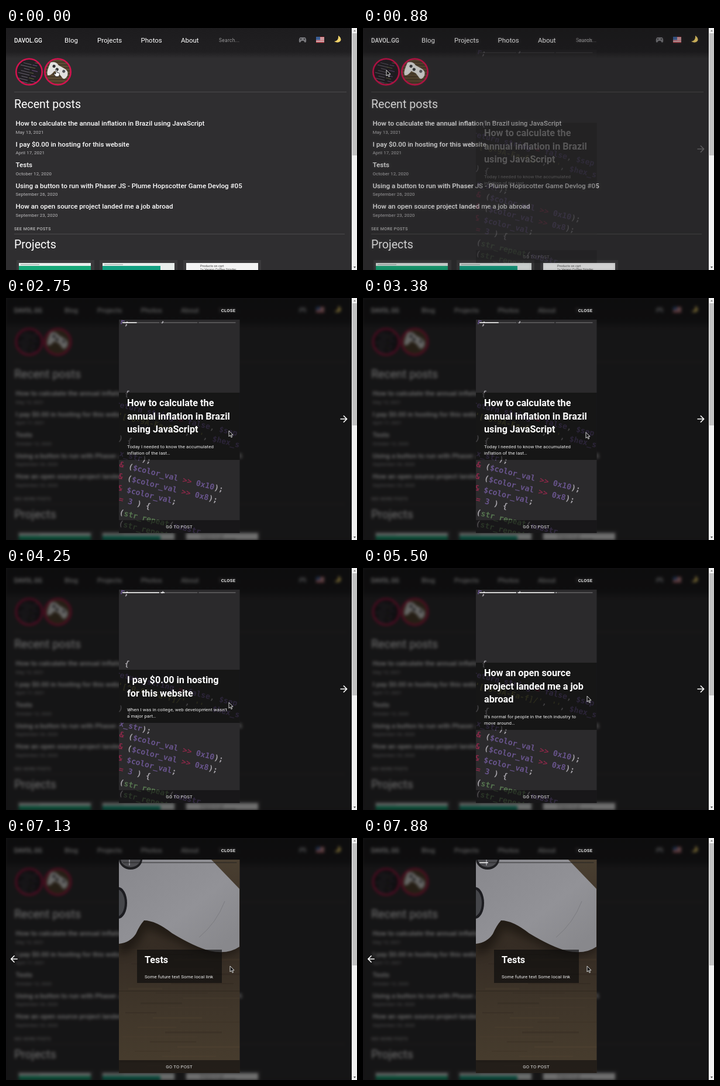
An HTML page with a canvas that plays this animation: 600 by 414 pixels, repeating every 8000 ms.

```html
<!DOCTYPE html>
<html lang="en">
<head>
<meta charset="utf-8">
<title>Blog stories</title>
<style>
  html, body { margin: 0; width: 100%; height: 100%; overflow: hidden; background: #2f2e30; }
  canvas { display: block; width: 600px; height: 414px; }
</style>
</head>
<body>
<canvas id="stage" width="600" height="414"></canvas>
<script>
const W = 600, H = 414, LOOP = 8000, OPEN = 880;
const FACE = 'Roboto, Arial, sans-serif';
const stage = document.getElementById('stage').getContext('2d');

const stories = [
  { from: OPEN, seg: 0, top: 162, bottom: 277,
    title: ['How to calculate the', 'annual inflation in Brazil', 'using JavaScript'],
    text: ['Today I needed to know the accumulated', 'inflation of the last…'] },
  { from: 3720, seg: 1, top: 174, bottom: 265,
    title: ['I pay $0.00 in hosting', 'for this website'],
    text: ['When I was in college, web development wasn’t', 'a major part…'] },
  { from: 5400, seg: 2, top: 162, bottom: 277,
    title: ['How an open source', 'project landed me a job', 'abroad'],
    text: ['It’s normal for people in the tech industry to', 'move around…'] },
  { from: 7120, wood: true, left: 224, right: 369, top: 191, bottom: 248,
    title: ['Tests'], text: ['Some future text Some local link'] }
];

// time, x, y of the pointer tip
const pointerPath = [
  [0, 86, 71], [130, 86, 71], [630, 40, 72], [950, 40, 72], [1600, 143, 115],
  [1750, 143, 115], [2500, 381, 227], [2800, 381, 227], [3500, 381, 230],
  [4500, 381, 230], [5250, 383, 219], [8000, 383, 219]
];

function layer(paint) {
  const canvas = document.createElement('canvas');
  canvas.width = W;
  canvas.height = H;
  paint(canvas.getContext('2d'));
  return canvas;
}

function box(c, x, y, w, h, color) {
  c.fillStyle = color;
  c.fillRect(x, y, w, h);
}

function text(c, str, x, y, size, color = '#fff', weight = 400, spacing = 0, align = 'left') {
  c.font = `${weight} ${size}px ${FACE}`;
  c.letterSpacing = spacing + 'px';
  c.textAlign = align;
  c.fillStyle = color;
  c.fillText(str, x, y);
  c.letterSpacing = '0px';
}

function disc(c, x, y, rx, ry, color) {
  c.fillStyle = color;
  c.beginPath();
  c.ellipse(x, y, rx, ry, 0, 0, 7);
  c.fill();
}

function shape(c, d, fill, stroke, width = 1) {
  const path = new Path2D(d);
  if (fill) { c.fillStyle = fill; c.fill(path); }
  if (stroke) { c.strokeStyle = stroke; c.lineWidth = width; c.stroke(path); }
}

function codeLine(c, str, x, y) {
  c.save();
  c.translate(x, y);
  c.rotate(0.24);
  c.font = 'bold 13.2px "DejaVu Sans Mono", monospace';
  c.textAlign = 'left';
  let at = 0;
  for (const part of str.match(/'[^']*'|\$\w+|str_\w+|\w+|[^\w$']/g)) {
    c.fillStyle = /^'/.test(part) ? '#67683c'
      : /^str_/.test(part) ? '#56744f'
      : /^[$\w]/.test(part) ? '#68548c'
      : /[>&=]/.test(part) ? '#8a2848' : '#a5a2a8';
    c.fillText(part, at, 0);
    at += c.measureText(part).width;
  }
  c.restore();
}

function ring(c, x, y, paint) {
  c.save();
  c.beginPath();
  c.arc(x, y, 21.5, 0, 7);
  c.clip();
  c.translate(x, y);
  paint(c);
  c.restore();
  c.strokeStyle = '#d3134f';
  c.lineWidth = 2.6;
  c.beginPath();
  c.arc(x, y, 22.2, 0, 7);
  c.stroke();
}

function ringCode(c) {
  box(c, -24, -24, 48, 48, '#222024');
  c.rotate(0.24);
  for (let i = 0; i < 9; i++) {
    const y = -18 + i * 4.6;
    box(c, -20 + (i * 7) % 11, y, 9 + (i * 5) % 14, 1, '#67616e');
    box(c, 6 - (i * 3) % 7, y, 7 + i % 4, 1, i % 2 ? '#6a4d80' : '#63653f');
  }
}

function ringPad(c) {
  box(c, -24, -24, 48, 48, '#4a3c2a');
  for (let y = -20; y < 24; y += 5) box(c, -24, y, 48, 1.3, '#67563a');
  c.rotate(0.35);
  c.scale(0.85, 0.85);
  shape(c, 'M-20-13Q-11-19-3-13L10-11Q20-10 21 0Q20 10 14 9L3 2L-7 1Q-11 14-17 13Q-22 9-20-13Z', '#e2e1df');
  disc(c, -11, -8, 3, 3, '#303033');
  disc(c, -3, -4, 3, 3, '#303033');
  disc(c, 11, -5, 3, 3, '#55555a');
}

function paintHeader(c) {
  const g = c.createLinearGradient(0, 0, 0, 52);
  g.addColorStop(0, '#1d1c1e');
  g.addColorStop(0.78, '#201f21');
  g.addColorStop(1, '#2f2e30');
  box(c, 0, 0, W, 52, g);
  text(c, 'DAVOL.GG', 14, 25, 10, '#fff', 500);
  for (const [label, x] of [['Blog', 100], ['Projects', 156], ['Photos', 230.5], ['About', 299]])
    text(c, label, x, 25, 11.5);
  text(c, 'Search...', 364, 24, 8.3, '#9b9a9c', 400, 0.35);

  shape(c, 'M503 16H511Q514 18 513 24Q510 26 509 22H505Q503 26 501 24Q500 18 503 16Z', '#77777b');
  disc(c, 504, 19, 1.2, 1.2, '#39393c');
  disc(c, 510, 19, 1.2, 1.2, '#39393c');

  for (let i = 0; i < 7; i++) box(c, 530, 15 + i * 1.45, 14, 1.5, i % 2 ? '#f3eeee' : '#cb4650');
  box(c, 530, 15, 7, 5.5, '#3b5f97');
  shape(c, 'M568 13Q574 17 572 22Q568 27 561 23Q569 22 568 13Z', '#f3d36b');
}

function paintCards(c) {
  for (const x of [18, 160, 303]) box(c, x, 397, 133, 17, '#3b3a3c');
  for (const [x, color, width] of [[22, '#16a878', 123], [165, '#12a081', 99]]) {
    box(c, x, 402, 123, 12, '#e9eeec');
    box(c, x, 407, width, 7, color);
    box(c, x + 3, 404, 32, 1.4, '#a9b4b0');
  }
  box(c, 308, 402, 123, 12, '#f4f4f4');
  text(c, 'Products on cart', 332, 409, 5.5, '#444');
  text(c, '1x Verano Coffee Grinder', 332, 415, 5.5, '#444');
}

const page = layer(c => {
  box(c, 0, 0, W, H, '#2f2e30');
  paintHeader(c);
  ring(c, 39.5, 75, ringCode);
  ring(c, 88.5, 75, ringPad);
  box(c, 14, 109, 568, 1, '#4b4a4c');
  text(c, 'Recent posts', 14, 137, 19.6);
  [
    ['How to calculate the annual inflation in Brazil using JavaScript', 'May 13, 2021'],
    ['I pay $0.00 in hosting for this website', 'April 17, 2021'],
    ['Tests', 'October 12, 2020'],
    ['Using a button to run with Phaser JS - Plume Hopscotter Game Devlog #05', 'September 26, 2020'],
    ['How an open source project landed me a job abroad', 'September 23, 2020']
  ].forEach(([title, date], i) => {
    text(c, title, 16.5, 167 + i * 35.5, 11.6, '#fff', 500);
    text(c, date, 16.5, 180.7 + i * 35.5, 7.9, '#bdbcbe', 400, 0.1);
  });
  text(c, 'SEE MORE POSTS', 14, 346, 7, '#e6e6e6', 400, 0.45);
  box(c, 14, 352, 565, 1, '#4b4a4c');
  text(c, 'Projects', 14, 377, 19.6);
  paintCards(c);
});

const backdrop = layer(c => {
  box(c, 0, 0, W, H, '#2f2e30');
  c.filter = 'blur(2.6px)';
  c.drawImage(page, 0, 0);
  c.filter = 'none';
  box(c, 0, 0, W, H, 'rgba(0,0,0,.55)');
});

function clipPicture(c) {
  c.beginPath();
  c.rect(193, 37, 206.5, 365);
  c.clip();
}

const codePicture = layer(c => {
  clipPicture(c);
  box(c, 193, 37, 207, 365, '#2b2a2c');
  codeLine(c, 'r;', 194, 44);
  codeLine(c, "',", 264, 41);
  codeLine(c, '{', 202, 167);
  codeLine(c, 'return_string = false, $sep', 186, 185);
  codeLine(c, "'[^0-9A-Fa-f]/', '', $hex_str", 190, 205);
  codeLine(c, ') {', 191, 244);
  codeLine(c, 'x_str);', 193, 270);
  codeLine(c, '& ($color_val >> 0x10);', 193, 288.5);
  codeLine(c, '& ($color_val >> 0x8);', 191, 308.5);
  codeLine(c, '& $color_val;', 190, 328.5);
  codeLine(c, '= 3 ) {', 192, 348);
  codeLine(c, '(str_repeat(substr', 193, 370.5);
  codeLine(c, '(str_repeat(substr', 192, 389.5);
});

const woodPicture = layer(c => {
  clipPicture(c);
  const wood = c.createLinearGradient(0, 37, 0, 402);
  wood.addColorStop(0, '#4a3f31');
  wood.addColorStop(0.42, '#352c24');
  wood.addColorStop(0.7, '#40362a');
  wood.addColorStop(1, '#483d2e');
  box(c, 193, 37, 207, 365, wood);
  for (let i = 0; i < 26; i++) {
    const y = 190 + i * 8.3;
    box(c, 193 + (i * 47) % 120, y, 50 + (i * 31) % 80, 1 + i % 3, i % 2 ? 'rgba(20,14,8,.12)' : 'rgba(130,105,70,.08)');
  }
  box(c, 193, 261, 207, 1.5, 'rgba(15,10,6,.2)');

  c.filter = 'blur(8px)';
  shape(c, 'M193 100L399 120V190Q360 215 300 180L240 155Q222 195 193 200Z', 'rgba(14,10,7,.55)');
  c.filter = 'none';
  const shell = c.createLinearGradient(220, 37, 350, 200);
  shell.addColorStop(0, '#89898e');
  shell.addColorStop(0.6, '#929297');
  shell.addColorStop(1, '#88888c');
  shape(c, 'M193 37H351L399 87V186Q379 200 348 193Q322 186 284 163Q256 141 236 141Q228 150 222 164Q212 179 193 181Z', shell);
  shape(c, 'M374 108Q360 145 330 170', null, 'rgba(70,70,72,.25)');
  disc(c, 213, 36, 20, 18, '#1f1f22');
  disc(c, 213, 35, 17, 15, '#4c4c50');
  shape(c, 'M211 37V47', null, '#b4b4ba', 1.2);
  disc(c, 192, 111, 15, 27, '#1c1c20');
  disc(c, 190, 111, 13, 23, '#45464a');
});

function paintProgress(c, story, t) {
  const age = t - story.from;
  const count = story.wood ? 1 : 3;
  const pitch = 195.5 / count, width = pitch - (count > 1 ? 2 : 0);
  for (let i = 0; i < count; i++) {
    const x = 199 + i * pitch;
    box(c, x, 41.5, width, 1.3, story.wood ? 'rgba(30,30,30,.65)' : 'rgba(255,255,255,.3)');
    const full = story.wood ? age * 0.0195
      : i < story.seg ? width
      : i === story.seg ? Math.min(width, age * 0.0131) : 0;
    box(c, x, 41.5, full, 1.5, '#fff');
  }
}

function paintStory(c, t) {
  const story = stories.filter(s => t >= s.from).pop();
  const { left = 193, right = 399.5, top, bottom } = story;
  c.drawImage(story.wood ? woodPicture : codePicture, 0, 0);
  box(c, left, top, right - left, bottom - top, 'rgba(12,11,12,.65)');
  box(c, 193, 380, 206.5, 22, 'rgba(12,11,12,.6)');

  const x = story.wood ? 237 : 207;
  const lead = top + (story.wood ? 22.5 : 22.8);
  story.title.forEach((line, i) => text(c, line, x, lead + i * 22.8, 16.2, '#fff', 700));
  const body = story.wood ? 239.5 : bottom - 20.3;
  story.text.forEach((line, i) => text(c, line, x, body + i * 11.6, 7.9, '#f2f2f2', 400, 0.12));

  paintProgress(c, story, t);
  text(c, 'CLOSE', 380, 24.3, 7.6, '#fff', 500, 0.3, 'center');
  text(c, 'GO TO POST', 296, 393.8, 7.7, '#e4e4e4', 400, 0.2, 'center');
  shape(c, story.wood ? 'M19.7 207H9M14.5 201.3L8.8 207L14.5 212.7' : 'M571.5 207H582.3M576.9 201.3L582.6 207L576.9 212.7',
    null, '#fff', 1.6);
}

function paintScrollbar(c) {
  box(c, 591, 0, 9, H, '#f1f1f1');
  box(c, 592, 9, 8, 209, '#c1c1c1');
  shape(c, 'M594 6L596 3L598 6Z', '#8a8a8a');
  shape(c, 'M594 408L596 411L598 408Z', '#505050');
}

function paintPointer(c, t) {
  const next = pointerPath.findIndex(p => p[0] > t);
  const [t0, x0, y0] = pointerPath[next - 1], [t1, x1, y1] = pointerPath[next];
  const k = (t - t0) / (t1 - t0), e = k * k * (3 - 2 * k);
  c.save();
  c.translate(x0 + (x1 - x0) * e, y0 + (y1 - y0) * e);
  if (t < OPEN) {
    shape(c, 'M-1 0Q1-1 1 1V5L5 6Q6 7 5 10L4 12H-1L-4 8Q-4 6-2 7L-1 8Z', '#fff', '#222', 0.8);
  } else {
    shape(c, 'M0 0V10L2.4 7.8L4 11.5L5.6 10.8L4 7.2H7Z', '#151515', '#e8e8e8', 0.9);
  }
  c.restore();
}

function draw(t) {
  stage.drawImage(page, 0, 0);
  if (t >= OPEN) {
    stage.globalAlpha = Math.min(1, (t - OPEN + 60) / 250);
    stage.drawImage(backdrop, 0, 0);
    paintStory(stage, t);
    stage.globalAlpha = 1;
  }
  paintScrollbar(stage);
  paintPointer(stage, t);
}

const start = performance.now();
function tick() {
  draw((performance.now() - start) % LOOP);
  requestAnimationFrame(tick);
}
tick();
</script>
</body>
</html>
```
